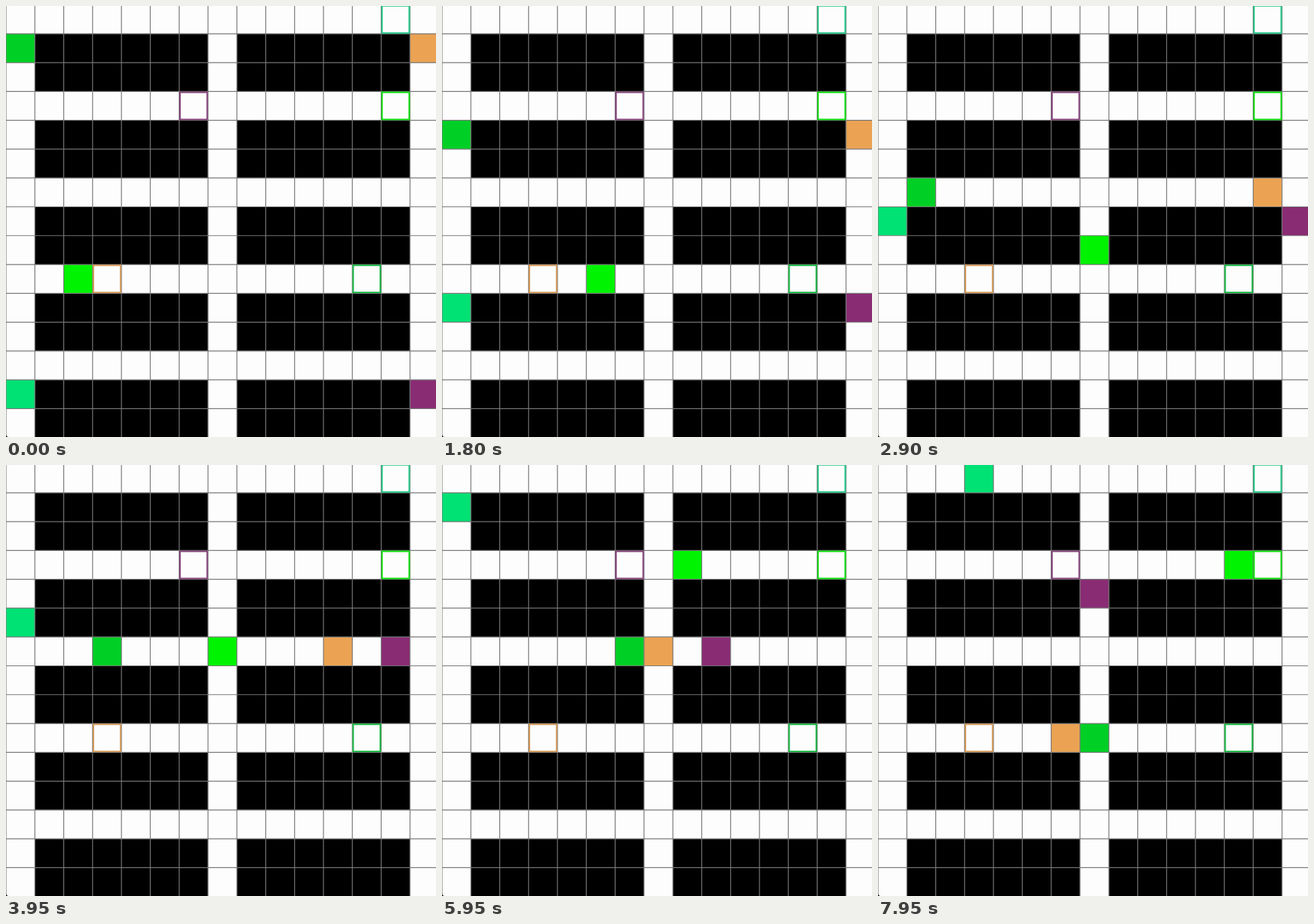
Write an HTML page with a canvas that moves like this. It is 600x602 px and loops after 8000 ms.

```html
<!DOCTYPE html>
<html lang="en">
<head>
<meta charset="utf-8">
<title>Grid path finding</title>
<style>
  html, body { margin: 0; width: 100%; height: 100%; overflow: hidden; background: #fdfdfd; }
  canvas { display: block; width: 600px; height: 602px; }
</style>
</head>
<body>
<canvas id="stage" width="600" height="602"></canvas>
<script>
const ctx = document.getElementById('stage').getContext('2d');
const LOOP = 8000, STEP = 502, FIRST = 390;
const CELL = 40.27, TOP = -1.4, N = 15;
const X = c => c * CELL;
const Y = r => TOP + r * CELL;
const DIRS = { U: [0, -1], D: [0, 1], L: [-1, 0], R: [1, 0], '.': [0, 0] };

// start cell, goal cell, one letter per move ('.' waits)
const agents = [
  { color: '#00d025', edge: '#16b843', start: [0, 1], goal: [12, 9], path: 'DDDDDRRRRRR.RDDD' },
  { color: '#eba353', edge: '#d3995a', start: [14, 1], goal: [3, 9], path: 'DDDDDLLLLLLLDDDL' },
  { color: '#00f300', edge: '#0be00b', start: [2, 9], goal: [13, 3], path: 'RRRRRUUUUUURRRRR' },
  { color: '#00e274', edge: '#22c98a', start: [0, 13], goal: [13, 0], path: 'UUUUUUUUUUUUURRR' },
  { color: '#8a2c74', edge: '#86437b', start: [14, 13], goal: [6, 3], path: 'UUUUUUULLLLLLLUU' }
];

function cellAt(agent, moves) {
  let [c, r] = agent.start;
  for (const m of agent.path.slice(0, moves)) {
    c += DIRS[m][0];
    r += DIRS[m][1];
  }
  return [c, r];
}

function fillCells(c, r, w, h, color) {
  ctx.fillStyle = color;
  ctx.fillRect(X(c), Y(r), w * CELL, h * CELL);
}

function drawGrid() {
  ctx.strokeStyle = '#777';
  ctx.lineWidth = 1.2;
  ctx.beginPath();
  for (let i = 0; i <= N; i++) {
    ctx.moveTo(X(i), 0);
    ctx.lineTo(X(i), 602);
    ctx.moveTo(0, Y(i));
    ctx.lineTo(600, Y(i));
  }
  ctx.stroke();
}

function draw(moves) {
  ctx.fillStyle = '#fdfdfd';
  ctx.fillRect(0, 0, 600, 602);
  for (let r = 1; r < N; r += 3) {
    fillCells(1, r, 6, 2, '#000');
    fillCells(8, r, 6, 2, '#000');
  }
  for (const a of agents) fillCells(...cellAt(a, moves), 1, 1, a.color);
  drawGrid();
  ctx.lineWidth = 2;
  for (const a of agents) {
    ctx.strokeStyle = a.edge;
    ctx.strokeRect(X(a.goal[0]) + 1.2, Y(a.goal[1]) + 1.2, CELL - 2.4, CELL - 2.4);
  }
  // clipped window corner
  ctx.fillStyle = '#000';
  ctx.beginPath();
  ctx.moveTo(0, 598);
  ctx.quadraticCurveTo(0, 602, 4, 602);
  ctx.lineTo(0, 602);
  ctx.fill();
}

let shown = -1;
function tick() {
  const t = performance.now() % LOOP;
  const moves = Math.max(0, Math.floor((t - FIRST) / STEP) + 1);
  if (moves !== shown) draw(shown = moves);
  requestAnimationFrame(tick);
}
tick();
</script>
</body>
</html>
```
